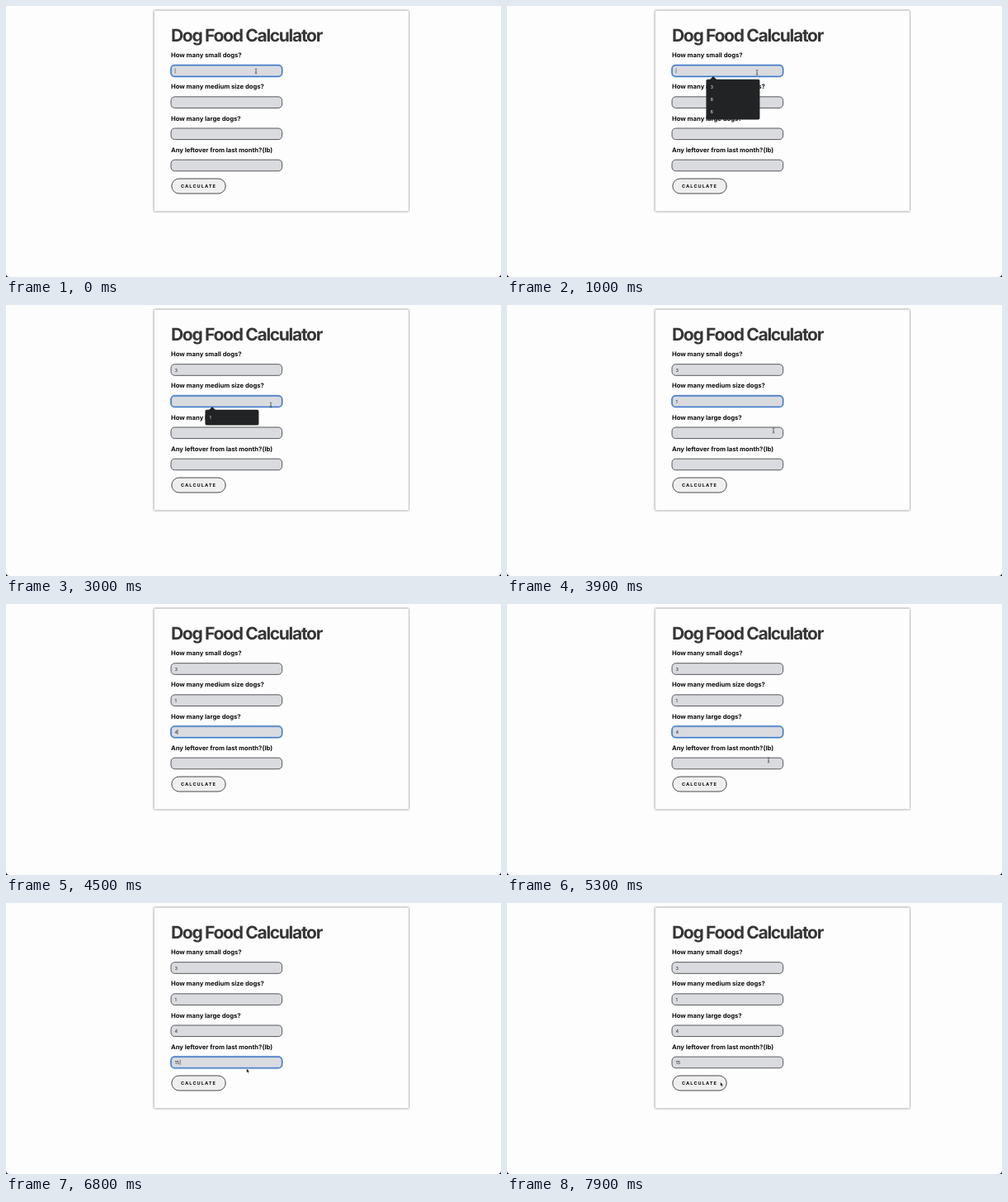
Write an HTML page that moves like this. It is 600x328 px and loops after 8000 ms.

```html
<!DOCTYPE html>
<html lang="en">
<head>
<meta charset="utf-8">
<title>Dog Food Calculator</title>
<style>
  html, body { margin: 0; width: 100%; height: 100%; overflow: hidden; background: #fdfdfd; }
  svg { display: block; font-family: Inter, Roboto, sans-serif; text-rendering: geometricPrecision; }
  .card { fill: #fdfdfd; filter: drop-shadow(0 .8px .8px rgba(0, 0, 0, .65)); }
  .title { font-size: 21px; font-weight: 700; letter-spacing: -1.3px; fill: #363636; }
  .label { font-size: 7.65px; font-weight: 700; fill: #0c0c0c; }
  .box { fill: #dadbdf; stroke: #58595d; stroke-width: 1; }
  .ring { fill: none; stroke: #4179c2; stroke-width: 1.2; }
  .glow { fill: none; stroke: #9dc0ee; stroke-width: 2.8; opacity: .6; }
  .value { font-size: 5.6px; fill: #222; }
  .caret { stroke: #555; stroke-width: .7; }
  .popup { fill: #212325; }
  .option { font-size: 5.6px; fill: #e6e6e6; }
  .button { fill: #efefef; stroke: #4a4a4a; stroke-width: 1; }
  .action { font-size: 5.6px; font-weight: 700; letter-spacing: 1.08px; fill: #0c0c0c; }
  .beam { fill: none; stroke: #333; stroke-width: .6; }
  .arrow { fill: #111; stroke: #fff; stroke-width: .5; }
</style>
</head>
<body>
<svg id="stage" width="600" height="328" viewBox="0 0 600 328">
  <rect class="card" x="179.5" y="5.5" width="308.5" height="243"/>
  <text class="title" x="200" y="43.3">Dog Food Calculator</text>
  <g id="fields"></g>
  <rect class="button" x="200.8" y="209" width="65.4" height="18" rx="9"/>
  <text class="action" x="212" y="220.2">CALCULATE</text>
  <g id="popups"></g>
  <g id="mouse">
    <path class="beam" d="M-1.3-3Q0-3 0-2.2V2.2Q0 3-1.3 3M1.3-3Q0-3 0-2.2M0 2.2Q0 3 1.3 3M-.8 .8H.8"/>
    <path class="arrow" d="M0 0V5.4L1.2 4.3 2.1 6.2 3 5.8 2.2 3.9H3.8Z"/>
  </g>
  <path d="M0 324V328H4Q0 328 0 324M600 324V328H596Q600 328 600 324"/>
</svg>
<script>
const LOOP = 8000, STEP = 100, BLINK = 500;
const get = id => document.getElementById(id);
const between = (t, from, to) => t >= from && t < to;
const show = (el, on) => el.setAttribute('visibility', on ? 'visible' : 'hidden');

// keys: [time, character]; the suggestion list is open during popup
const fields = [
  { label: 'How many small dogs?', focus: 0, blur: 2500, popup: [100, 1700], options: [3, 8, 6], keys: [[1700, '3']] },
  { label: 'How many medium size dogs?', focus: 2500, blur: 4000, popup: [2500, 3200], options: [1], keys: [[3200, '1']] },
  { label: 'How many large dogs?', focus: 4000, blur: 5400, popup: [4000, 4500], options: [4], keys: [[4500, '4']] },
  { label: 'Any leftover from last month?(lb)', focus: 5400, blur: 7900, popup: [5400, 6500], options: [15], keys: [[6000, '1'], [6500, '5']] }
];

// [time, x, y]
const path = [
  [0, 303, 79], [400, 303, 79], [1000, 303, 80.5], [1800, 303, 80.5], [2300, 313.5, 111],
  [2500, 317, 117], [2700, 317, 118], [3000, 321, 121], [3300, 321, 121], [3900, 323, 152],
  [4000, 323, 154], [4200, 326, 156], [4600, 326, 156], [5300, 317, 189], [5700, 316.5, 189.5],
  [6600, 308, 192], [7200, 258.5, 216.5], [LOOP, 258.5, 216.5]
];
// the pointer disappears while typing
const typing = [[1700, 1900], [3200, 3400], [4500, 4700], [6000, 6700]];

fields.forEach((f, row) => {
  const y = f.y = 78.5 + 38.15 * row;
  const box = name => `<rect class="${name}" x="200" y="${y - 6.8}" width="134.6" height="13.6" rx="4.5"/>`;
  const group = document.createElementNS('http://www.w3.org/2000/svg', 'g');
  group.innerHTML = `<text class="label" x="200" y="${y - 16.2}">${f.label}</text>${box('box')}
    <g>${box('glow')}${box('ring')}</g>
    <text class="value" x="204.6" y="${y + 2}"></text>
    <path class="caret" d="M0 ${y - 3.2}v6.2"/>`;
  get('fields').append(group);
  [, , f.ring, f.value, f.caret] = group.children;

  f.list = document.createElementNS('http://www.w3.org/2000/svg', 'g');
  f.list.innerHTML = `<rect class="popup" x="241.4" y="${y + 10.2}" width="65" height="${3.7 + 15 * f.options.length}" rx="2"/>
    <path class="popup" d="M246 ${y + 10.4}l4-3.8 4 3.8z"/>` +
    f.options.map((o, i) => `<text class="option" x="246.5" y="${y + 21.7 + 15 * i}">${o}</text>`).join('');
  get('popups').append(f.list);
});

function pointer(t) {
  const i = path.findIndex(p => p[0] > t);
  const [t0, x0, y0] = path[i - 1], [t1, x1, y1] = path[i];
  const k = (t - t0) / (t1 - t0);
  return [x0 + (x1 - x0) * k, y0 + (y1 - y0) * k];
}

function draw(now) {
  const t = Math.floor(now % LOOP / STEP) * STEP;
  for (const f of fields) {
    const typed = f.keys.filter(k => k[0] <= t);
    const since = typed.length ? typed[typed.length - 1][0] : f.focus;
    const focused = between(t, f.focus, f.blur);
    f.value.textContent = typed.map(k => k[1]).join('');
    f.caret.setAttribute('transform', `translate(${205 + 3.1 * typed.length})`);
    show(f.ring, focused);
    show(f.caret, focused && (t - since) % (2 * BLINK) < BLINK);
    show(f.list, between(t, ...f.popup));
  }
  const [x, y] = pointer(t), [beam, arrow] = get('mouse').children;
  const hidden = typing.some(span => between(t, ...span));
  const overField = fields.some(f => Math.abs(y - f.y) < 7);
  get('mouse').setAttribute('transform', `translate(${x} ${y})`);
  show(beam, !hidden && overField);
  show(arrow, !hidden && !overField);
  requestAnimationFrame(draw);
}
requestAnimationFrame(draw);
</script>
</body>
</html>
```
